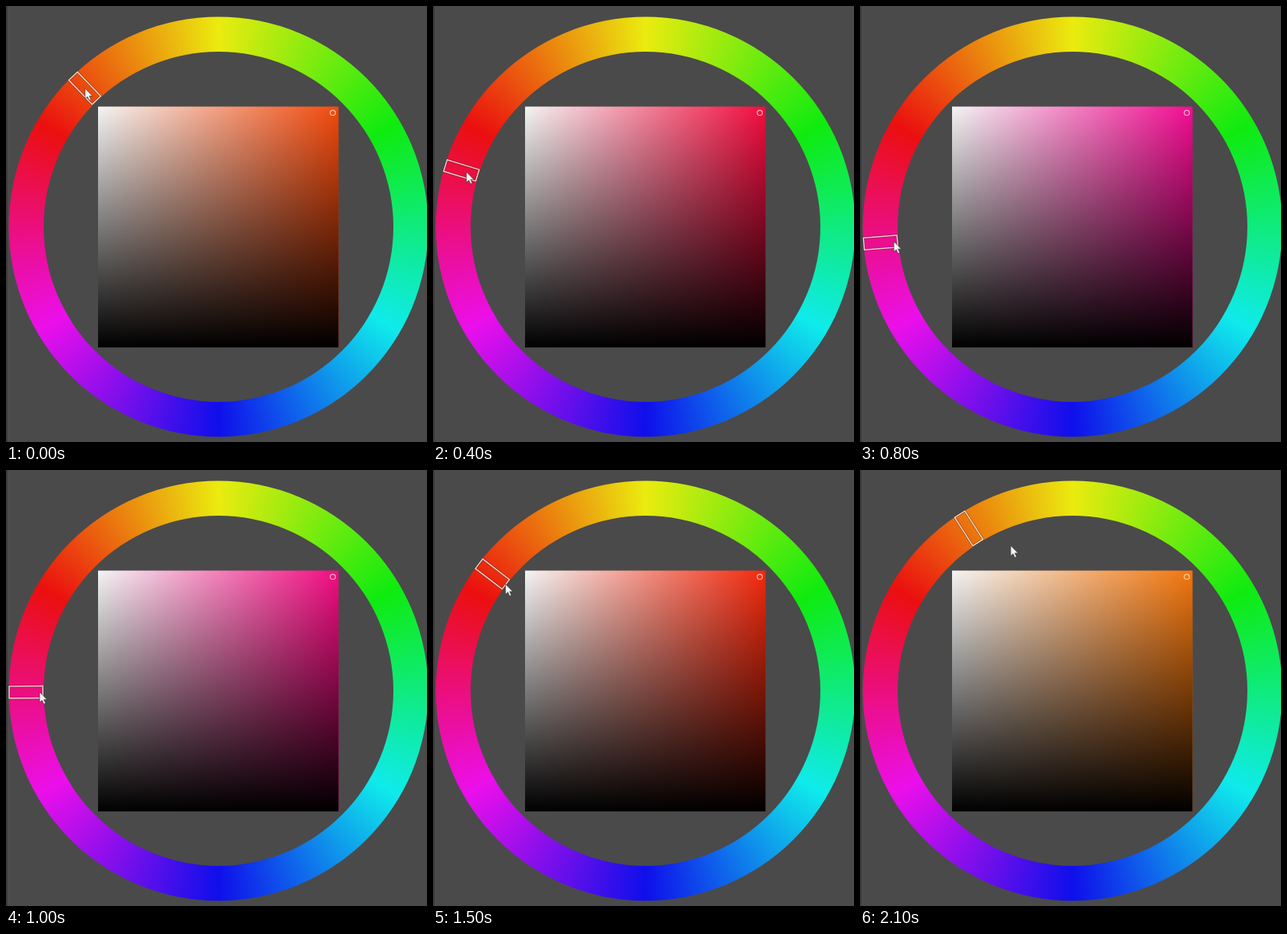
An HTML page with a canvas for the animation above (2200 ms loop, 526 by 544 pixels).

```html
<!DOCTYPE html>
<html lang="en">
<head>
<meta charset="utf-8">
<title>Colour wheel</title>
<style>
  html, body { margin: 0; width: 100%; height: 100%; overflow: hidden; background: #4a4a4a; }
  canvas { display: block; }
</style>
</head>
<body>
<canvas id="stage" width="526" height="544"></canvas>
<script>
const ctx = document.getElementById('stage').getContext('2d');
const CX = 265.5, CY = 275.5, OUTER = 262, INNER = 218.5;
const BOX = { x: 115, y: 125.5, size: 300.5 };
const LOOP = 2200, STEP = 100, RELEASE = 32.6;
const rad = deg => deg * Math.PI / 180;

// Pointer path: time, degrees counter-clockwise from the top, distance from the centre
const path = [
  [0, 44, 240], [400, 73, 234], [600, 91.7, 225.6], [1000, 90.4, 223.5],
  [1500, 52.7, 220], [1800, 36.9, 217], [2100, 23.1, 197]
];

function slope(i, k) {
  const a = path[Math.max(i - 1, 0)], b = path[Math.min(i + 1, path.length - 1)];
  return (b[k] - a[k]) / (b[0] - a[0]);
}

// Smooth Hermite curve through the path points
function along(t, k) {
  let i = 0;
  while (i < path.length - 2 && t >= path[i + 1][0]) i++;
  const a = path[i], b = path[i + 1], d = b[0] - a[0], u = (t - a[0]) / d;
  const v = 1 - u;
  return a[k] * v * v * (1 + 2 * u) + b[k] * u * u * (3 - 2 * u)
    + d * u * v * (slope(i, k) * v - slope(i + 1, k) * u);
}

function drawRing() {
  const g = ctx.createConicGradient(rad(-150), CX, CY);
  for (let i = 0; i <= 6; i++) g.addColorStop(i / 6, `hsl(${i * 60}, 88%, 49%)`);
  ctx.beginPath();
  ctx.arc(CX, CY, OUTER, 0, 2 * Math.PI);
  ctx.arc(CX, CY, INNER, 0, 2 * Math.PI, true);
  ctx.fillStyle = g;
  ctx.fill();
}

function fillBox(x1, y1, from, to) {
  const { x, y, size } = BOX;
  const g = ctx.createLinearGradient(x, y, x1, y1);
  g.addColorStop(0, from);
  g.addColorStop(1, to);
  ctx.fillStyle = g;
  ctx.fillRect(x, y, size, size);
}

function drawBox(hue) {
  const { x, y, size } = BOX;
  fillBox(x + size, y, '#f4f4f4', `hsl(${hue}, 90%, 50%)`);
  fillBox(x, y + size, 'rgba(0,0,0,0)', '#000');
  ctx.beginPath();
  ctx.arc(408.3, 133.3, 3.2, 0, 2 * Math.PI);
  ctx.strokeStyle = 'rgba(255,245,225,.7)';
  ctx.lineWidth = 1.2;
  ctx.stroke();
}

function drawMarker(angle) {
  ctx.save();
  ctx.translate(CX, CY);
  ctx.rotate(rad(-90 - angle));
  ctx.strokeStyle = 'rgba(40,30,30,.35)';
  ctx.lineWidth = 3;
  ctx.strokeRect(219.5, -7.5, 42, 15);
  ctx.strokeStyle = 'rgba(255,244,232,.85)';
  ctx.lineWidth = 1.4;
  ctx.strokeRect(219.5, -7.5, 42, 15);
  ctx.restore();
}

function drawPointer(angle, r) {
  ctx.save();
  ctx.translate(CX - r * Math.sin(rad(angle)), CY - r * Math.cos(rad(angle)));
  const arrow = new Path2D('M0 0V13L3 10.3L5.2 15L7.4 14L5.3 9.5H9.3Z');
  ctx.fillStyle = '#f2f2f2';
  ctx.fill(arrow);
  ctx.strokeStyle = 'rgba(40,40,40,.7)';
  ctx.lineWidth = 0.8;
  ctx.stroke(arrow);
  ctx.restore();
}

function draw() {
  const t = Math.floor(performance.now() % LOOP / STEP) * STEP;
  const pointer = along(t, 1), angle = Math.max(RELEASE, pointer);
  ctx.fillStyle = '#4a4a4a';
  ctx.fillRect(0, 0, 526, 544);
  ctx.fillStyle = '#3b3b3b';
  ctx.fillRect(0, 0, 2, 544);
  drawRing();
  drawBox(60 - angle);
  drawMarker(angle);
  drawPointer(pointer, along(t, 2));
  requestAnimationFrame(draw);
}
draw();
</script>
</body>
</html>
```
